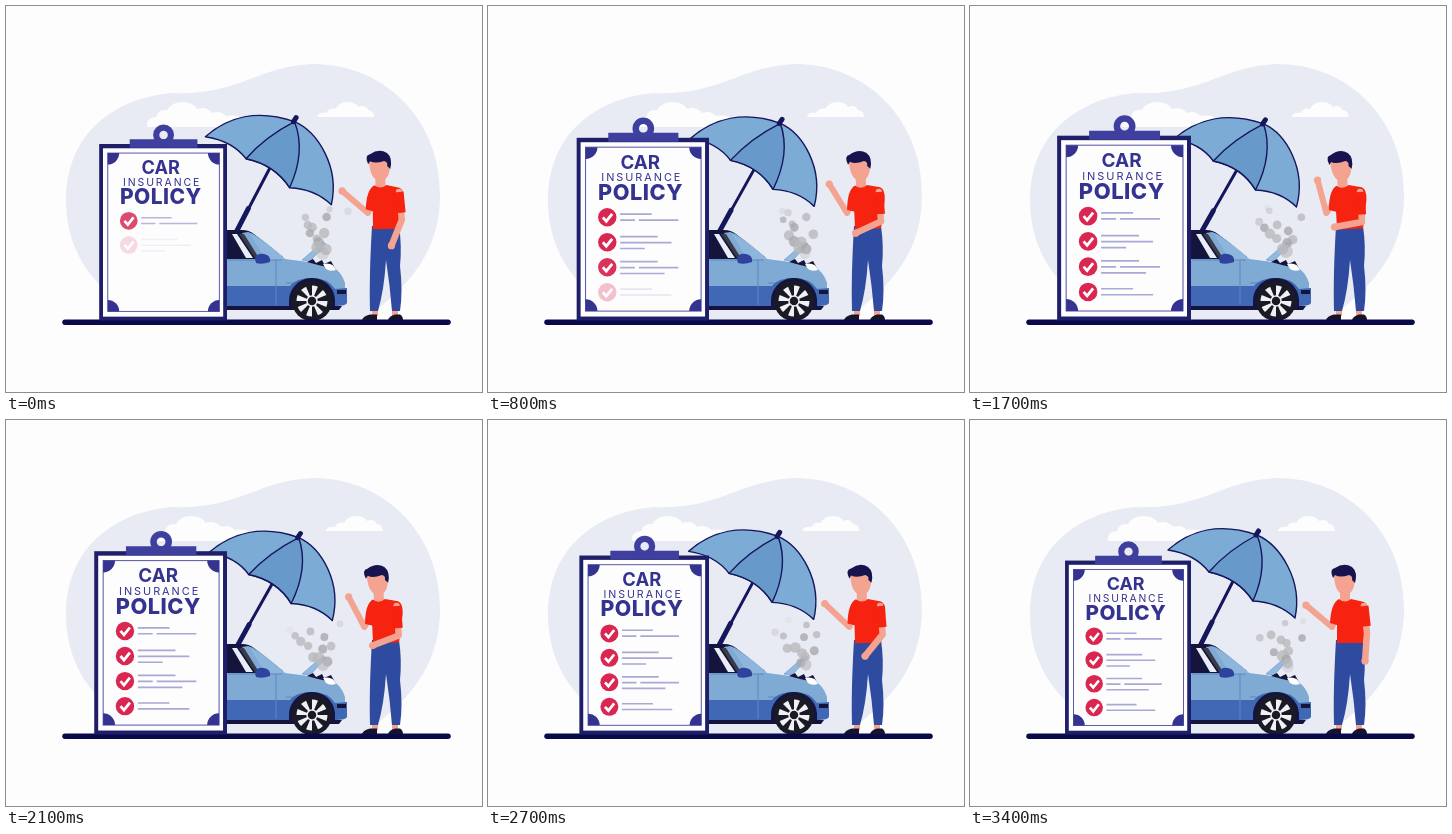
These frames come from a looping animation (476 px wide and 386 px high, 3.5 s). An HTML page:

```html
<!DOCTYPE html>
<html>
<head>
<meta charset="utf-8">
<style>
html, body { margin: 0; width: 100%; height: 100%; overflow: hidden; background: #fdfdfd; }
svg { display: block; }
text { font-family: Inter, Arial, sans-serif; fill: #34338f; text-anchor: middle; }
.limb { fill: none; stroke-linecap: round; stroke-linejoin: round; }
.skin { fill: #f4a391; }
.ink { fill: #15143c; }
</style>
</head>
<body>
<svg width="476" height="386" viewBox="0 0 476 386">
  <defs>
    <path id="corner" d="M96 139h12a12 12 0 0 1-12 12z" fill="#34338f"/>
  </defs>
  <path fill="#e8ebf4" d="M60 195C60 130 105 93 165 87C232 90 252 60 307 58C380 58 434 115 434 188C434 240 410 270 380 296Q368 307 355 314H160C110 305 60 262 60 195Z"/>

  <g id="clouds" fill="#fdfdfd">
    <path d="M308 111Q309 106 317 107Q320 101 326 103Q330 96 338 96Q346 96 349 101Q356 98 359 104Q365 105 365 111Z"/>
    <path d="M138 121Q136 112 147 111Q149 103 158 104Q163 96 173 96Q184 96 188 103Q197 100 203 107Q211 104 217 110Q230 108 234 115Q241 115 241 121Z"/>
  </g>

  <g id="umbrella" stroke-linejoin="round" stroke="#15165c">
    <path class="limb" stroke-width="3" d="M284 120L231 224"/>
    <path class="limb" stroke-width="5" d="M242 202L231 224"/>
    <path fill="#7cacd5" stroke-width="1.4" d="M198 130C220 110 250 102 287 115C310 125 333 160 325 198Q308 182 283 181Q268 158 239 152Q225 134 198 130Z"/>
    <path fill="#6899cb" stroke-width="1.4" d="M287 115Q258 130 239 152Q268 158 283 181Q299 145 287 115Z"/>
    <path class="limb" stroke-width="5" d="M286 115L288.500 111"/>
  </g>

  <g id="car">
    <path class="ink" d="M215 224H236Q243 224 248 228L277 251L270 255H215Z"/>
    <path fill="#7faad4" d="M242 226Q250 227 279 253L318 258Q334 261 339 277V292H215V253H252L236 227Z"/>
    <path fill="#e9edf5" d="M226 228H231L247 252H240Z"/>
    <path fill="#3a3a48" d="M233 228H238L253 252H249Z"/>
    <path fill="#8eb6dd" d="M244 228Q262 237 279 253L260 254Z"/>
    <path fill="#4168b4" d="M215 280H284Q290 272 306 272Q322 272 329 283L341 282V297Q340 300 330 300H215Z"/>
    <path class="ink" d="M215 300H336L333 304H215Z"/>
    <path fill="none" stroke="#5c88c0" d="M222 254H276M270 254V299M280 277h6"/>
    <path fill="#2e439e" d="M249 253Q250 247 258 248Q265 249 264 256Q256 259 250 257Z"/>
    <path fill="#92b9df" stroke="#6f9dcc" stroke-width=".7" d="M296 254L317 236L320 238L304 255Z"/>
    <path class="ink" d="M301 256L307 253L310 257L316 254L318 258L325 255L330 264L321 261L312 259Z"/>
    <path fill="#fff" d="M317 258Q327 256 330 264Q324 266 320 263Z"/>
    <path class="ink" d="M331 284h9v4h-9z M283 297A23 23 0 0 1 329 293V304H283Z"/>
    <g transform="translate(306 295)" fill="#1a1a26">
      <circle r="20"/>
      <circle r="10" fill="none" stroke="#f1f1f5" stroke-width="11" pathLength="16" stroke-dasharray="1"/>
      <circle r="5" stroke="#f1f1f5" stroke-width="1.5"/>
    </g>
  </g>
  <g id="smoke"></g>

  <path stroke="#0a0a4a" stroke-width="5.500" stroke-linecap="round" d="M59 316.300H442"/>

  <g id="man">
    <path class="skin" d="M366 302h6v8h-6z M386 302h6v8h-6z"/>
    <path fill="#14142c" d="M356 314Q357 310 364 308.500H371V314Z M382 314Q383 310 389 308.500H394Q397 310 397 314Z"/>
    <path fill="#2f4b9f" d="M366 220H393Q396 240 394 260Q397 285 394 305H386Q384 280 380 254Q378 285 372 305H364Q363 270 366 220Z"/>
    <path id="armL" class="limb" stroke="#f4a391" stroke-width="6"/>
    <circle id="handL" class="skin" r="3.600"/>
    <g id="body">
      <path class="skin" d="M370 168H380V181Q375 185 370 181Z"/>
      <path fill="#f5230f" d="M369 179Q375 184 381 179L394 182Q399 184 398 195L393 223H367V205L360 203Q361 183 369 179Z"/>
      <path class="skin" d="M364 156Q364 150 374 150Q385 150 385 160Q384 174 375 175Q365 174 364 156Z"/>
      <path fill="#16134f" d="M363 158Q359 149 365 148Q374 142 382 147Q388 152 385 163L382 160Q383 156 379 155Q370 158 365 155Z"/>
    </g>
    <path id="armR" class="limb" stroke="#f4a391" stroke-width="6.500"/>
    <circle id="handR" class="skin" r="3.600"/>
    <path id="sleeve" class="limb" stroke="#f5230f" stroke-width="9" style="stroke-linecap:butt"/>
  </g>

  <g id="board">
    <rect x="87" y="129.500" width="134" height="185" fill="#1f1f69"/>
    <rect x="91" y="134" width="126" height="176.500" fill="#fdfdfe"/>
    <rect x="96" y="139" width="117" height="166" fill="none" stroke="#5352a6"/>
    <use href="#corner"/>
    <use href="#corner" transform="translate(309 0) scale(-1 1)"/>
    <use href="#corner" transform="translate(0 444) scale(1 -1)"/>
    <use href="#corner" transform="translate(309 444) scale(-1 -1)"/>
    <path fill="#3f3f9f" d="M119 124.500H190V133.500H119Z"/>
    <circle cx="154.500" cy="120" r="7.700" fill="none" stroke="#3f3f9f" stroke-width="6.500"/>
    <text x="151.500" y="161" font-size="19" font-weight="700">CAR</text>
    <text x="153" y="173.500" font-size="11" letter-spacing="2">INSURANCE</text>
    <text x="151.700" y="192.500" font-size="22" font-weight="800" letter-spacing=".5">POLICY</text>
    <g id="rows"></g>
  </g>
</svg>
<script>
const $ = id => document.getElementById(id);
const clamp = v => Math.max(0, Math.min(1, v));
const mix = (a, b, u) => a + (b - a) * u;
const set = (el, attrs) => { for (const k in attrs) el.setAttribute(k, attrs[k]); return el; };
const add = (parent, tag, attrs) =>
  parent.appendChild(set(document.createElementNS('http://www.w3.org/2000/svg', tag), attrs));

let seed = 7;
const random = () => (seed = seed * 16807 % 2147483647) / 2147483647;

// Inner rows have three lines; every other row has a broken second line
const rows = [0, 1, 2, 3].map(i => {
  const g = add($('rows'), 'g', {});
  const y = 210 + 25.3 * i, inner = i % 3 > 0, broken = i % 2 === 0;
  const top = y - (inner ? 5.7 : 3.2);
  let d = `M131 ${top}h${inner ? 38 : 32}M131 ${top + 6}`;
  d += broken ? 'h15m4 0h40' : 'h52';
  if (inner) d += `M131 ${top + 12}h${broken ? 45 : 25}`;
  add(g, 'path', { d, stroke: '#a8a9d5', 'stroke-width': 1.7 });
  add(g, 'circle', { cx: 118, cy: y, r: 9.3, fill: '#d92752' });
  add(g, 'path', { d: `M113.500 ${y}l3.500 4 6-7.500`, fill: 'none', stroke: '#fff', 'stroke-width': 2.8 });
  return g;
});

// Puffs leave the engine at even intervals and spread upwards
const puffs = Array.from({ length: 30 }, (_, i) => ({
  birth: -2500 + i * 200,
  angle: -Math.PI * mix(0.34, 0.76, random()),
  size: mix(0.75, 1.1, random()),
  el: add($('smoke'), 'circle', { fill: i % 3 ? '#b9b9bc' : '#a7a7ab' })
}));

function drawSmoke(t) {
  for (const p of puffs) {
    const d = (t - p.birth) * 0.02;
    set(p.el, {
      cx: 318 + d * Math.cos(p.angle), cy: 249 + d * Math.sin(p.angle),
      r: p.size * mix(6.5, 3.5, clamp(d / 50)),
      opacity: 0.8 * clamp(d / 5) * clamp((54 - d) / 14)
    });
  }
}

function drawArm(side, shoulder, elbow, length, degrees) {
  const a = degrees * Math.PI / 180;
  const x = elbow[0] + length * Math.cos(a), y = elbow[1] + length * Math.sin(a);
  set($('arm' + side), { d: `M${shoulder}L${elbow}L${x} ${y}` });
  set($('hand' + side), { cx: x, cy: y });
}

function draw(t) {
  // One slow swell shared by everything that sways
  const u = Math.cos(Math.PI / 2 * Math.min(1, Math.abs(t - 1500) / 1900)) ** 1.3;
  set($('board'), { transform: `translate(221 314) scale(${mix(0.94, 1, u)}) translate(-221 -314)` });
  set($('umbrella'), { transform: `translate(232 ${222 + 3 * u}) skewX(${-3.6 * u}) translate(-232 -222)` });
  set($('clouds'), { transform: `translate(${14 * u})` });
  set($('body'), { transform: `rotate(${-3.3 * u} 379 222)` });

  const wave = u ** 3;
  drawArm('L', [mix(367, 364, u), 196], [mix(362, 356, wave), 207], 34, mix(220, 257, wave));
  const shoulder = [mix(394, 390, u), 186], elbow = [mix(397, 392, u), mix(213, 216, u)];
  drawArm('R', shoulder, elbow, 28, mix(94, 171, u));
  const cuff = [0, 1].map(k => mix(shoulder[k], elbow[k], 0.75));
  set($('sleeve'), { d: `M${shoulder}L${cuff}` });

  rows.forEach((g, i) => set(g, { opacity: clamp((t + 460 - 370 * i) / 550) }));
  drawSmoke(t);
}

function tick() {
  draw(Math.floor(performance.now() % 3500 / 100) * 100);
  requestAnimationFrame(tick);
}
tick();
</script>
</body>
</html>
```
